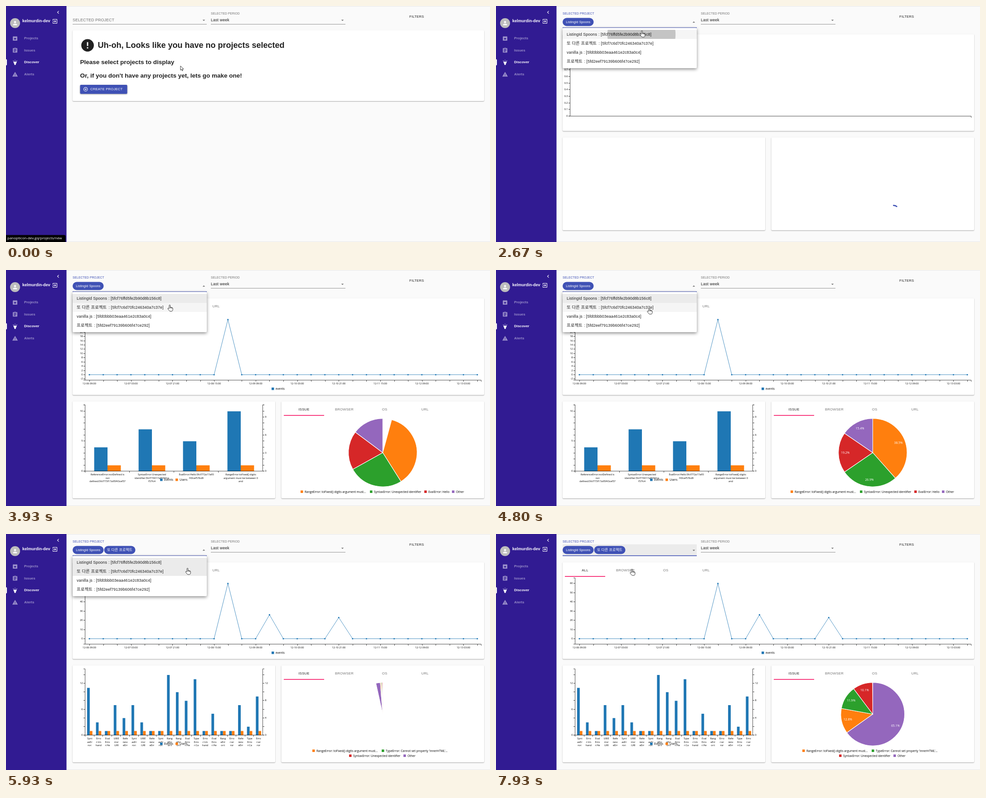
These frames come from a looping animation (1068 by 524 pixels, 8 s). An HTML page with a canvas:

```html
<!DOCTYPE html>
<html lang="en">
<head>
<meta charset="utf-8">
<title>Discover dashboard</title>
<style>
html, body { margin: 0; width: 100%; height: 100%; overflow: hidden; background: #fafafa; }
canvas { display: block; }
</style>
</head>
<body>
<canvas id="stage" width="1068" height="524"></canvas>
<script>
const ctx = document.getElementById('stage').getContext('2d');
const LOOP = 8000;
const UI = "'Liberation Sans', Arial, 'Noto Sans CJK KR', sans-serif";
const CHART = "'Open Sans', 'Noto Sans', sans-serif";
const INK = 'rgba(0,0,0,.87)', MUTED = 'rgba(0,0,0,.54)', PRIMARY = '#3f51b5', PINK = '#f50057';
const BLUE = '#1f77b4', ORANGE = '#ff7f0e', GREEN = '#2ca02c', RED = '#d62728', PURPLE = '#9467bd';

// Moments (ms) when the state changes
const OPEN = 1180, PICK1 = 2540, LOADED = 2950, PICK2 = 4930, PIE_AGAIN = 5102,
  BARS2 = 5312, LINE2 = 5530, PIE2 = 5726, CLOSE = 7270;

const ICONS = {
  archive: 'M20.54 5.23l-1.39-1.68C18.88 3.21 18.47 3 18 3H6c-.47 0-.88.21-1.16.55L3.46 5.23C3.17 5.57 3 6.02 3 6.5V19c0 1.1.9 2 2 2h14c1.1 0 2-.9 2-2V6.5c0-.48-.17-.93-.46-1.27zM12 17.5L6.5 12H10v-2h4v2h3.5L12 17.5zM5.12 5l.81-1h12l.94 1H5.12z',
  list: 'M19 3h-4.18C14.4 1.84 13.3 1 12 1c-1.3 0-2.4.84-2.82 2H5c-1.1 0-2 .9-2 2v14c0 1.1.9 2 2 2h14c1.1 0 2-.9 2-2V5c0-1.1-.9-2-2-2zm-7 0c.55 0 1 .45 1 1s-.45 1-1 1-1-.45-1-1 .45-1 1-1zm2 14H7v-2h7v2zm3-4H7v-2h10v2zm0-4H7V7h10v2z',
  torch: 'M6 14l3 3v5h6v-5l3-3V9H6zm5-12h2v3h-2zM3.5 5.875L4.914 4.46l2.12 2.122L5.62 7.997zm13.46.71l2.123-2.12 1.414 1.414L18.375 8z',
  warning: 'M1 21h22L12 2 1 21zm12-3h-2v-2h2v2zm0-4h-2v-4h2v4z',
  exit: 'M10.09 15.59L11.5 17l5-5-5-5-1.41 1.41L12.67 11H3v2h9.67l-2.58 2.59zM19 3H5c-1.11 0-2 .9-2 2v4h2V5h14v14H5v-4H3v4c0 1.1.89 2 2 2h14c1.1 0 2-.9 2-2V5c0-1.1-.9-2-2-2z',
  back: 'M15.41 7.41L14 6l-6 6 6 6 1.41-1.41L10.83 12z',
  person: 'M12 12c2.21 0 4-1.79 4-4s-1.79-4-4-4-4 1.79-4 4 1.79 4 4 4zm0 2c-2.67 0-8 1.34-8 4v2h16v-2c0-2.66-5.33-4-8-4z',
  error: 'M12 2C6.48 2 2 6.48 2 12s4.48 10 10 10 10-4.48 10-10S17.52 2 12 2zm1 15h-2v-2h2v2zm0-4h-2V7h2v6z',
  add: 'M13 7h-2v4H7v2h4v4h2v-4h4v-2h-4V7zm-1-5C6.48 2 2 6.48 2 12s4.48 10 10 10 10-4.48 10-10S17.52 2 12 2zm0 18c-4.41 0-8-3.59-8-8s3.59-8 8-8 8 3.59 8 8-3.59 8-8 8z',
  down: 'M7 10l5 5 5-5z',
  up: 'M7 14l5-5 5 5z'
};
const ARROW = new Path2D('M0 0V9.5L2.2 7.5L3.8 11L5.4 10.3L3.9 7H7Z');
const HAND = new Path2D('M-1.2 8V1.2Q-1.2 0 0 0T1.2 1.2V5L5.5 6Q6.8 6.4 6.8 8V10Q6.8 13 5 14H.3Q-1 13 -4.2 8.5Q-4.3 6.8 -2.8 7.2ZM1.2 5V7.5M3.1 5.5V7.6M5 6V8');

// time, x, y, hand
const POINTER = [
  [200, 385, 133, 0], [480, 300, 62, 0], [600, 252, 39, 1], [870, 180, 27, 1], [1870, 180, 27, 1],
  [2270, 322, 55, 1], [3200, 322, 55, 1], [3330, 375, 56, 1], [3430, 410, 48, 0], [3620, 410, 48, 0],
  [3750, 402, 60, 1], [4070, 330, 91, 1], [4200, 308, 92, 1], [4600, 338, 84, 1], [4800, 338, 84, 1],
  [4930, 341, 84, 1], [5700, 341, 84, 1], [6100, 444, 70, 0], [6530, 541, 57, 0], [7420, 541, 57, 0],
  [7600, 440, 66, 0], [7740, 330, 76, 1], [7930, 300, 78, 1]
];
const ITEMS = [
  ['ListingId Spoons', ': [5fcf76ffd5fe2b90d8b156c8]', 225.9],
  ['또 다른 프로젝트', ': [5fcf7c6d70fc246340a7c37e]', 226.5],
  ['vanilla js', ': [5fd0bbb03eaa461e2c83a0c4]', 193.5],
  ['프로젝트', ': [5fd2eef79139b606f47ce292]', 194.5]
];
const FIRST_BARS = {
  values: [4, 7, 5, 10], unit: 13.33, step: 1, max: 11, left: 5, right: 3,
  labels: [
    ['ReferenceError:notDefined is', 'not', 'defined:5fcf773f17a95f43cef57'],
    ['SyntaxError:Unexpected', 'identifier:5fcf774017a95f43ce', 'f57fc4'],
    ['EvalError:Hello:5fcf772a17a95', 'f43cef57bd9'],
    ['RangeError:toFixed() digits', 'argument must be between 0', 'and']
  ]
};
const KINDS = { S: 'SyntaxError:', U: 'Error:Unhand', E: 'EvalError:He', I: 'URIError:URI',
  R: 'ReferenceErr', G: 'RangeError:t', T: 'TypeError:Ca', O: 'Error:error' };
const SECOND_BARS = {
  values: [11, 3, 1, 7, 4, 7, 3, 1, 1, 14, 10, 8, 13, 1, 5, 1, 1, 7, 2, 9],
  unit: 9.58, step: 2, max: 14, left: 3, right: 2,
  labels: [...'SUEIRSIRSGGETUEGORTO'].map(k => KINDS[k].match(/.{1,4}/g))
};
const RANGE = 'RangeError: toFixed() digits argument must...', SYNTAX = 'SyntaxError: Unexpected identifier';

const clamp = v => Math.min(1, Math.max(0, v));
const cubic = v => (v = clamp(v)) < .5 ? 4 * v ** 3 : 1 - 4 * (1 - v) ** 3;
const mix = (a, b, p) => a + (b - a) * p;

function text(s, x, y, size, color = INK, { align = 'left', weight = 400, font = UI, gap = 0 } = {}) {
  ctx.font = `${weight} ${size}px ${font}`;
  ctx.letterSpacing = gap + 'px';
  ctx.textAlign = align;
  ctx.textBaseline = 'middle';
  ctx.fillStyle = color;
  ctx.fillText(s, x, y);
}
const chartText = (s, x, y, size = 5.5, align = 'center', color = '#000') =>
  text(s, x, y + .4, size, color, { align, font: CHART });

function rect(x, y, w, h, color, radius = 0) {
  ctx.fillStyle = color;
  ctx.beginPath();
  ctx.roundRect(x, y, w, h, radius);
  ctx.fill();
}
function line(color, width, ...points) {
  ctx.strokeStyle = color;
  ctx.lineWidth = width;
  ctx.beginPath();
  for (let i = 0; i < points.length; i += 2) ctx.lineTo(points[i], points[i + 1]);
  ctx.stroke();
}
const axisLine = (...points) => line('#000', .7, ...points);

function disc(x, y, r, color) {
  ctx.fillStyle = color;
  ctx.beginPath();
  ctx.arc(x, y, r, 0, 7);
  ctx.fill();
}
function icon(name, x, y, color, size = 13.35) {
  ctx.save();
  ctx.translate(x - size / 2, y - size / 2);
  ctx.scale(size / 24, size / 24);
  ctx.fillStyle = color;
  ctx.fill(new Path2D(ICONS[name]), 'evenodd');
  ctx.restore();
}
function raised(x, y, w, h, color, radius = 2, blur = 2, drop = 1, alpha = .35) {
  ctx.save();
  ctx.shadowColor = `rgba(0,0,0,${alpha})`;
  ctx.shadowBlur = blur;
  ctx.shadowOffsetY = drop;
  rect(x, y, w, h, color, radius);
  ctx.restore();
}
function faded(alpha, draw) {
  ctx.save();
  ctx.globalAlpha *= clamp(alpha);
  draw();
  ctx.restore();
}

function sidebar() {
  const dim = 'rgba(255,255,255,.5)';
  rect(0, 0, 133.5, 524, '#311b92');
  icon('back', 115, 14, '#fff');
  disc(20, 38, 11, '#bdbdbd');
  icon('person', 20, 38, '#fafafa', 14);
  text('kelmurdin-dev', 36, 33.5, 9, '#fff', { weight: 700 });
  icon('exit', 108, 34, '#fff');
  rect(-2, 118, 4, 14, '#fff', 2);
  [['archive', 'Projects'], ['list', 'Issues'], ['torch', 'Discover'], ['warning', 'Alerts']].forEach(([name, label], i) => {
    const y = 72 + i * 26.6, color = i === 2 ? '#fff' : dim;
    icon(name, 20, y, color);
    text(label, 40, y, 7.9, color, { weight: 700 });
  });
}

function header(t) {
  const shrink = cubic((t - OPEN) / 200), picked = t >= PICK1, open = t >= OPEN && t < CLOSE;
  const base = picked ? 48 : 40;
  if (t > CLOSE + 200) rect(147, 23, 296, 25, 'rgba(0,0,0,.06)');
  text('SELECTED PROJECT', 147, mix(31.5, 17.5, shrink), mix(8.9, 6.7, shrink), shrink > .1 ? PRIMARY : MUTED, { gap: .08 });
  line('rgba(0,0,0,.42)', 1, 147, base + .5, 443, base + .5);
  if (t > 600 && t < OPEN) line(INK, 1, 147, base + .5, 443, base + .5);
  if (shrink) line(PRIMARY, 1.5, 295 - 148 * shrink, base + .3, 295 + 148 * shrink, base + .3);
  icon(open ? 'up' : 'down', 436.5, picked ? 36 : 31.5, MUTED);
  if (picked) {
    rect(147, 26.5, 68.5, 18, PRIMARY, 9);
    text(ITEMS[0][0], 181.2, 36, 7.3, '#fff', { align: 'center' });
  }
  if (t >= PICK2) {
    rect(216.5, 26.5, 69, 18, PRIMARY, 9);
    text(ITEMS[1][0], 251, 35.5, 8, '#fff', { align: 'center' });
  }
  text('SELECTED PERIOD', 452, 17.5, 6.7, MUTED, { gap: .06 });
  text('Last week', 452, 31.5, 8.9, INK, { gap: .08 });
  line('rgba(0,0,0,.42)', 1, 452, 40.5, 749, 40.5);
  icon('down', 742.5, 31.5, MUTED);
  text('FILTERS', 890, 24, 7.7, INK, { gap: .2 });
}

function emptyState() {
  const heading = (s, x, y, size) => text(s, x, y, size, '#212121', { weight: 700 });
  raised(147, 54, 908, 157, '#fff');
  icon('error', 180, 87.3, '#212121', 33.4);
  heading('Uh-oh, Looks like you have no projects selected', 202.5, 88.4, 18);
  heading('Please select projects to display', 163.5, 125.2, 13.5);
  heading("Or, if you don't have any projects yet, lets go make one!", 163.5, 155.2, 13.5);
  raised(163.5, 175, 104, 20, PRIMARY, 2, 3, 1, .4);
  icon('add', 175.7, 185, '#fff', 11.2);
  text('CREATE PROJECT', 186, 185.3, 7.7, '#fff', { gap: .2 });
}

function tabs(x, y, names, lineY) {
  names.forEach((name, i) => text(name, x + 44.5 + i * 89, y, 7.7, i ? MUTED : INK, { align: 'center', gap: .2 }));
  rect(x, lineY, 89, 1.4, PINK);
}

// Vertical axis; side is -1 for labels on the left, 1 on the right
function axis(x, top, bottom, zero, unit, from, to, step, every, side = -1, format = String) {
  axisLine(x + 3.5 * side, top, x, top, x, bottom, x + 3.5 * side, bottom);
  for (let i = 0, v = from; v <= to + 1e-6; v = from + step * ++i) {
    const y = Math.round(zero - v * unit) + .5;
    axisLine(x, y, x + 3.5 * side, y);
    if (i % every === 0) chartText(format(v), x + 5 * side, y, 5.5, side < 0 ? 'right' : 'left');
  }
}

function legend(y, ...entries) {
  for (const [x, color, label] of entries) {
    rect(x, y - 3, 5.5, 5.5, color);
    chartText(label, x + 9, y, 6.5, 'left');
  }
}

function lineChart(t) {
  const second = t >= LINE2, unit = second ? 2.043 : 4.71;
  const peaks = second ? { 10: 60, 13: 26, 18: 23 } : { 10: 26 };
  const px = i => 184 + i * 30.57, py = i => 232.5 - (peaks[i] || 0) * unit;
  tabs(152, 81.3, ['ALL', 'BROWSER', 'OS', 'URL'], 93.5);
  if (second) axis(174.5, 97.5, 244.5, 232, unit, 0, 60, 10, 1);
  else axis(174.5, 97.5, 244.5, 232, unit, -2, 28, 2, 1);
  axisLine(174.5, 244.5, 1048.5, 244.5, 1048.5, 248);
  const all = [...Array(29).keys()];
  for (const i of all) {
    const tick = Math.round(px(i)) + .5;
    axisLine(tick, 244.5, tick, 248);
    if (i % 3) continue;
    const hours = 9 + i * 6, pad = n => String(n).padStart(2, '0');
    chartText(`12-${pad(6 + Math.floor(hours / 24))} ${pad(hours % 24)}:00`, px(i), 252.3);
  }
  faded(cubic((t - (second ? LINE2 : LOADED)) / 300), () => {
    line(BLUE, .8, ...all.flatMap(i => [px(i), py(i)]));
    for (const i of all) disc(px(i), py(i), 1.6, BLUE);
  });
  legend(264, [586, BLUE, 'events']);
}

function barChart(t) {
  const second = t >= BARS2, set = second ? SECOND_BARS : FIRST_BARS;
  const slot = 392 / set.values.length, bar = slot * .3;
  faded(cubic((t - (second ? BARS2 : LOADED)) / 250), () => set.values.forEach((v, i) => {
    const mid = 175 + slot * (i + .5);
    rect(mid - bar, 447 - v * set.unit, bar, v * set.unit, BLUE);
    rect(mid, 447 - set.unit, bar, set.unit, ORANGE);
  }));
  axis(174.5, 299.5, 446.5, 446, set.unit, 0, set.max, set.step, set.left);
  axis(566.5, 299.5, 446.5, 446, set.unit, 0, set.max, set.step, set.right, 1);
  axisLine(174.5, 446.5, 566.5, 446.5);
  set.labels.forEach((rows, i) => {
    const edge = Math.round(175 + slot * i) - .5;
    axisLine(edge, 446.5, edge, 450);
    rows.forEach((row, n) => chartText(row, 175 + slot * (i + .5), 454.3 + n * 7.4));
  });
  legend(466, [340, BLUE, 'Events'], [374, ORANGE, 'Users']);
}

function pie(slices, cx, cy, r, progress, labelAlpha) {
  const turn = 2 * Math.PI;
  let sum = 0;
  for (const [share, color] of slices) {
    const angle = s => turn * (1 - (1 - s / 100) * progress) - Math.PI / 2;
    const from = angle(sum), to = angle(sum += share);
    if (progress > 0) {
      ctx.beginPath();
      ctx.moveTo(cx, cy);
      ctx.arc(cx, cy, r, from, to);
      ctx.closePath();
      ctx.fillStyle = color;
      ctx.fill();
      ctx.strokeStyle = '#fff';
      ctx.lineWidth = 1.1;
      ctx.stroke();
    }
    const mid = (from + to) / 2;
    faded(labelAlpha, () => chartText(share + '%', cx + r * .8 * Math.cos(mid), cy + r * .8 * Math.sin(mid), 6.7, 'center', '#fff'));
  }
}

function pieChart(t) {
  tabs(613, 310.3, ['ISSUE', 'BROWSER', 'OS', 'URL'], 322);
  if (t < PIE2) {
    const again = t >= PIE_AGAIN, start = again ? PIE_AGAIN : 3150, dx = again ? 4 : 0;
    pie([[38.5, ORANGE], [26.9, GREEN], [19.2, RED], [15.4, PURPLE]], 831.3, 405.5, 75.7,
      cubic((t - start) / 1000), (t - start - 980) / 150);
    legend(492.5, [650 + dx, ORANGE, RANGE], [803 + dx, GREEN, SYNTAX], [923 + dx, RED, 'EvalError: Hello'], [984 + dx, PURPLE, 'Other']);
  } else {
    pie([[65.1, PURPLE], [12.8, ORANGE], [11.9, GREEN], [10.1, RED]], 831.3, 400, 70.3,
      cubic((t - PIE2) / 1000), (t - PIE2 - 740) / 130);
    legend(481.5, [676, ORANGE, RANGE], [829, GREEN, "TypeError: Cannot set property 'innerHTML'..."]);
    legend(492.5, [757, RED, SYNTAX], [877, PURPLE, 'Other']);
  }
}

function dashboard(t) {
  const loaded = t >= LOADED, height = loaded ? 215.5 : 206.5;
  raised(147, 62.5, 908, 215, '#fff');
  raised(147, 291.5, 447, height, '#fff');
  raised(607.5, 291.5, 447.5, height, '#fff');
  if (loaded) {
    lineChart(t);
    barChart(t);
    pieChart(t);
    return;
  }
  axis(163.5, 97.5, 244.5, 244, 147, 0, 1, .1, 1, -1, v => v ? v.toFixed(1) : '0');
  axisLine(163.5, 244.5, 1048.5, 244.5, 1048.5, 248);
  if (t > 2620) {
    const start = -Math.PI / 2 - .08 + (t - 2670) * .0045;
    ctx.strokeStyle = PRIMARY;
    ctx.lineWidth = 2.4;
    ctx.beginPath();
    ctx.arc(877, 455, 12.2, start, start + .4 + (t - 2620) * .008);
    ctx.stroke();
  }
}

function ripple(t, start, x, y) {
  const age = t - start;
  if (age < 0 || age > 560) return;
  ctx.save();
  ctx.beginPath();
  ctx.rect(147, y, 296, 20);
  ctx.clip();
  const grow = clamp(age / 550);
  disc(x, y + 10, 177 * grow * grow * (3 - 2 * grow) + 34 * (1 - grow), `rgba(0,0,0,${.2 * clamp((560 - age) / 300)})`);
  ctx.restore();
}

function menu(t, pointer) {
  if (t < OPEN || t > CLOSE + 220) return;
  const shown = 1 - (1 - clamp((t - OPEN) / 270)) ** 3, top = t < PICK1 ? 40.5 : 48.5;
  faded(shown * (1 - clamp((t - CLOSE) / 220)), () => {
    ctx.translate(295, top);
    ctx.scale(mix(.75, 1, shown), mix(.56, 1, shown));
    ctx.translate(-295, -top);
    raised(147, top, 296, 89.5, '#fff', 2, 7, 2.5, .45);
    const hover = pointer.hand && pointer.x < 443 ? Math.floor((pointer.y - top - 4.5) / 20) : -1;
    ITEMS.forEach(([name, id, x], i) => {
      const y = top + 4.5 + i * 20;
      const selected = i === 0 && t > PICK1 + 160 || i === 1 && t > PICK2;
      const focused = i === hover || i === 0 && t < PICK1 + 160;
      if (selected || focused) rect(147, y, 296, 20, `rgba(0,0,0,${selected ? .08 : .04})`);
      if (i === 0) ripple(t, 2470, 321, y);
      if (i === 1) ripple(t, 4815, 339, y);
      text(name, 156, y + 10.6, i % 2 ? 9.4 : 8.9, INK, { gap: .08 });
      text(id, x, y + 10.6, 8.9, INK, { gap: .08 });
    });
  });
}

function pointerAt(t) {
  const next = POINTER.findIndex(k => k[0] > t);
  if (next === 0 || next < 0) {
    const [, x, y, hand] = POINTER.at(next < 0 ? -1 : 0);
    return { x, y, hand };
  }
  const a = POINTER[next - 1], b = POINTER[next], p = (t - a[0]) / (b[0] - a[0]);
  return { x: mix(a[1], b[1], p), y: mix(a[2], b[2], p), hand: a[3] };
}

function drawPointer({ x, y, hand }) {
  ctx.save();
  ctx.translate(x, y);
  ctx.fillStyle = '#fff';
  ctx.strokeStyle = '#222';
  ctx.lineWidth = .9;
  const shape = hand ? HAND : ARROW;
  ctx.fill(shape);
  ctx.stroke(shape);
  ctx.restore();
}

function draw() {
  const t = performance.now() % LOOP, pointer = pointerAt(t);
  rect(0, 0, 1068, 524, '#fafafa');
  rect(133, 0, 935, 1, '#e6e6e6');
  rect(133, 523, 935, 1, '#e6e6e6');
  sidebar();
  header(t);
  if (t < PICK1) emptyState();
  else dashboard(t);
  menu(t, pointer);
  faded(1 - (t - 200) / 250, () => {
    rect(0, 508.5, 131.5, 16, '#000', [0, 3, 0, 0]);
    text('panopticon-dev.gq/projects/new', 3, 516.2, 8, '#fff', { font: CHART });
  });
  drawPointer(pointer);
  requestAnimationFrame(draw);
}
draw();
</script>
</body>
</html>
```
